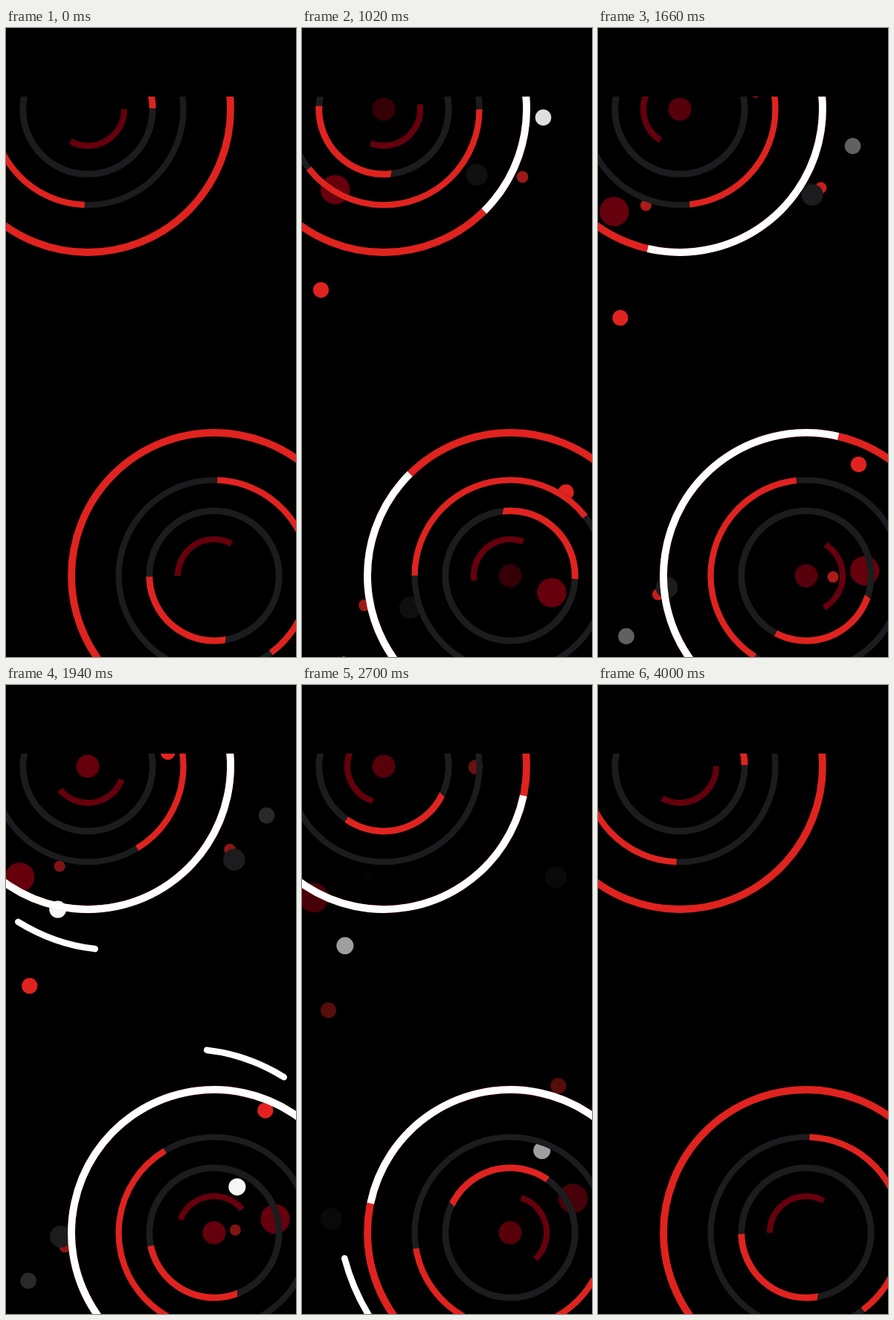
An HTML page for the animation above (4.02 s loop, 390 px wide and 844 px high).

```html
<!DOCTYPE html>
<html lang="en">
<head>
<meta charset="utf-8">
<title>Orbiting rings</title>
<style>
  html, body { margin: 0; width: 100%; height: 100%; overflow: hidden; background: #000; }
  svg { display: block; width: 100vw; height: 100vh; }
</style>
</head>
<body>
<svg viewBox="0 0 390 844">
  <defs>
    <clipPath id="below"><rect y="92" width="390" height="752"/></clipPath>
    <g id="dots"></g>
    <g id="rings" fill="none"></g>
  </defs>
  <g clip-path="url(#below)">
    <use href="#dots"/>
    <use href="#rings" transform="translate(110 109) rotate(180)"/>
  </g>
  <use href="#dots" transform="translate(380.5 974.5) rotate(180)"/>
  <use href="#rings" transform="translate(280 735)"/>
</svg>
<script>
const LOOP = 4020, CYCLE = 4000;
const RED = '#e0231f', MAROON = '#66000c', GRAY = '#1c1c1e', WHITE = '#fff';
const rings = document.getElementById('rings');
const dots = document.getElementById('dots');

function shape(parent, tag, attrs) {
  const node = document.createElementNS('http://www.w3.org/2000/svg', tag);
  for (const name in attrs) node.setAttribute(name, attrs[name]);
  return parent.appendChild(node);
}

const dash = span => ({ pathLength: 360, 'stroke-dasharray': `${span} ${360 - span}` });

const ring = (r, width, color, extra) =>
  shape(rings, 'circle', { r, stroke: color, 'stroke-width': width, ...extra });

// An arc covers `span` degrees, starts at `start` and makes `turns` rounds per cycle.
const arc = (r, width, color, span, start, turns) =>
  ({ node: ring(r, width, color, dash(span)), start, turns });

const center = {
  node: shape(rings, 'circle', { r: 15.5, fill: MAROON }),
  born: 0, gone: CYCLE, rise: 2000, fall: 1530
};
ring(192, 9.8, RED);
ring(128.5, 8.2, GRAY);
ring(87.2, 8.8, GRAY);
const arcs = [
  arc(192, 9.8, WHITE, 184.7, -51.2, 1),
  arc(128.5, 8.2, RED, 141.6, 272, -1),
  arc(87.2, 8.8, RED, 99.2, 79.8, 2),
  arc(49, 8, MAROON, 118.7, 180, -4)
];

// A short stroke sweeps backwards along a tilted ellipse.
const comet = shape(rings, 'ellipse', {
  rx: 257, ry: 220, transform: 'rotate(56.5)', stroke: WHITE,
  'stroke-width': 8.6, 'stroke-linecap': 'round', ...dash(26.5)
});

// Each dot lives from `born` to `gone`, easing out between two points;
// `ease` is the power for x and y, `rise` and `fall` are the fade times.
const particles = [
  { r: 7.5, color: RED, born: 1100, gone: 2750, rise: 400, fall: 1400,
    from: [48, 227.3], to: [90, 258.5], ease: [1.2, 1] },
  { r: 19.7, color: MAROON, born: 250, gone: 3950, rise: 450, fall: 1750,
    from: [147, 177], to: [16, 312], ease: [6.5, 1.5] },
  { r: 7.8, color: RED, born: 300, gone: 2650, rise: 1030, fall: 1120,
    from: [292.9, 183.5], to: [304.6, 236.9], ease: [1, 1] },
  { r: 14.7, color: GRAY, born: 300, gone: 3050, rise: 1350, fall: 1100,
    from: [159, 162.4], to: [347, 264.4], ease: [1.7, 1.35] },
  { r: 10.6, color: RED, born: 250, gone: 2950, rise: 400, fall: 650,
    from: [19.6, 301.5], to: [36.4, 443], ease: [1.3, 1.3] },
  { r: 10.8, color: WHITE, born: 300, gone: 2150, rise: 400, fall: 1290,
    from: [304, 77], to: [356.4, 187.6], ease: [1, 1] },
  { r: 11.5, color: WHITE, born: 1700, gone: 3950, rise: 250, fall: 2000,
    from: [75.2, 285.7], to: [52.7, 429.7], ease: [2.5, 1] },
  { r: 9.8, color: RED, born: 1300, gone: 3150, rise: 420, fall: 940,
    from: [204.4, 74.2], to: [242.7, 121.6], ease: [1, 1] }
];
for (const p of particles) p.node = shape(dots, 'circle', { r: p.r, fill: p.color });

const clamp01 = v => Math.min(1, Math.max(0, v));

const fade = (p, t) => clamp01(Math.min((t - p.born) / p.rise, (p.gone - t) / p.fall));

function place(p, t, axis) {
  const left = 1 - clamp01((t - p.born) / (p.gone - p.born));
  return p.to[axis] + (p.from[axis] - p.to[axis]) * left ** p.ease[axis];
}

function draw(t) {
  for (const a of arcs) {
    a.node.setAttribute('transform', `rotate(${a.start + 360 * a.turns * t / CYCLE})`);
  }
  comet.setAttribute('stroke-dashoffset', (t - 2220) / 6 - 166.7);
  comet.setAttribute('visibility', t > 1600 && t < 3000 ? 'visible' : 'hidden');
  center.node.setAttribute('opacity', fade(center, t));
  for (const p of particles) {
    p.node.setAttribute('cx', place(p, t, 0));
    p.node.setAttribute('cy', place(p, t, 1));
    p.node.setAttribute('opacity', fade(p, t));
  }
}

const begin = performance.now();
function frame() {
  draw(Math.min((performance.now() - begin) % LOOP, CYCLE));
  requestAnimationFrame(frame);
}
frame();
</script>
</body>
</html>
```
